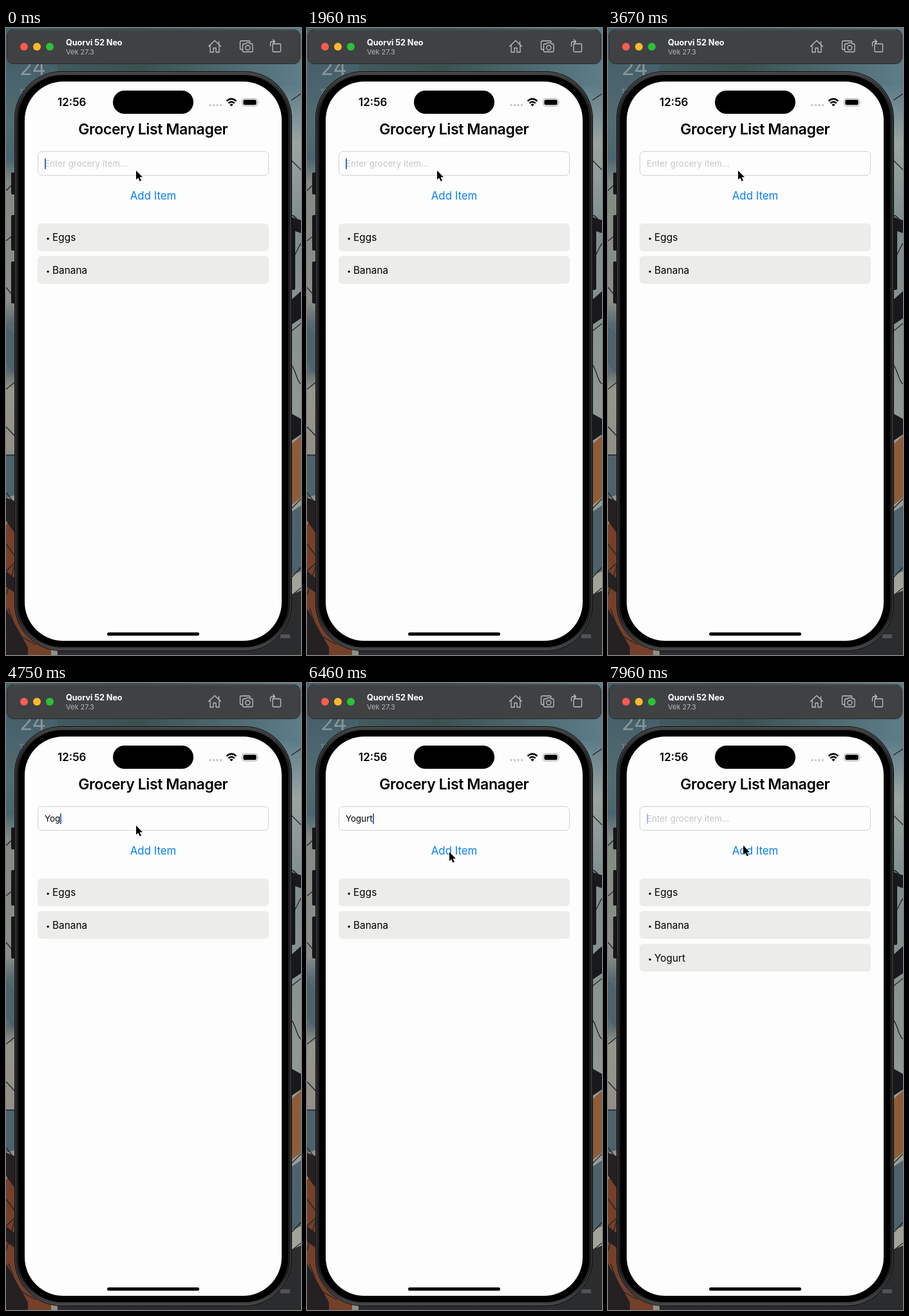
An HTML page for the animation above (8 s loop, 458x972 px).

```html
<!DOCTYPE html>
<html lang="en">
<head>
<meta charset="utf-8">
<title>Grocery List Manager</title>
<style>
  :root { --loop: 8s; }
  html, body { margin: 0; width: 100%; height: 100%; overflow: hidden; background: #2b2c2e; }
  body { position: relative; font-family: Inter, "Open Sans", sans-serif; }
  svg { position: absolute; left: 0; top: 0; width: 458px; height: 972px; }
  .item { font-size: 15.4px; }
  .item rect { fill: #ececea; }
  .bullet { font-size: 11px; }

  .field {
    position: absolute; left: 49px; top: 191px; width: 359px; height: 38px;
    box-sizing: border-box; padding-left: 10px;
    border: 1px solid #cfcfd9; border-radius: 7px;
    display: flex; align-items: center;
    font-size: 13.4px; line-height: 1.35; white-space: pre;
  }
  .placeholder { position: absolute; left: 10px; color: #c6c6ca; animation: placeholder var(--loop) step-end infinite; }
  .word { font-size: 0; animation: word var(--loop) step-end infinite; }
  .word i { font-style: normal; font-size: 0; animation: letter var(--loop) var(--at) step-end infinite; }
  .caret { width: 2px; height: 17px; border-radius: 1px; background: #4468c8; animation: caret var(--loop) linear infinite; }
  .added { animation: added var(--loop) step-end infinite; }
  .pointer { animation: pointer var(--loop) ease-in-out infinite; }

  @keyframes placeholder { 0%, 87% { visibility: visible } 53% { visibility: hidden } }
  @keyframes word { 0%, 87% { font-size: 0 } 50% { font-size: 13.4px } }
  /* Each letter stays until the whole word has been cleared. */
  @keyframes letter { 0% { font-size: 1em } 40%, 100% { font-size: 0 } }
  @keyframes added { 0% { visibility: hidden } 87%, 100% { visibility: visible } }
  @keyframes caret {
    0%, 6%, 12%, 18%, 24.4%, 30.5%, 37%, 43%, 49%, 93% { opacity: 1 }
    8%, 11%, 20%, 23%, 32.5%, 36%, 45%, 48%, 95%, 98.8% { opacity: 0 }
    99.5%, 100% { opacity: .35 }
  }
  @keyframes pointer {
    0%, 71% { transform: translate(202px, 221px) }
    79%, 88% { transform: translate(221px, 262px) }
    94%, 100% { transform: translate(210px, 252px) }
  }
</style>
</head>
<body>
<svg viewBox="0 0 458 972">
  <defs>
    <linearGradient id="sky">
      <stop stop-color="#46606a"/><stop offset=".45" stop-color="#3a5150"/><stop offset="1" stop-color="#5d7d88"/>
    </linearGradient>
    <linearGradient id="leftWall" x2="0" y2="1">
      <stop stop-color="#46606a"/><stop offset=".1" stop-color="#526b72"/>
      <stop offset=".16" stop-color="#48656f"/><stop offset=".2" stop-color="#838983"/>
      <stop offset=".4" stop-color="#8b8e88"/><stop offset=".44" stop-color="#566970"/>
      <stop offset=".52" stop-color="#5b6a6c"/><stop offset=".55" stop-color="#97968c"/>
      <stop offset=".67" stop-color="#908e86"/>
    </linearGradient>
    <linearGradient id="rightWall" x2="0" y2="1">
      <stop stop-color="#5d7d88"/><stop offset=".1" stop-color="#9aa5a2"/>
      <stop offset=".25" stop-color="#7e8c8d"/><stop offset="1" stop-color="#a9a79b"/>
    </linearGradient>
    <linearGradient id="rim" x2="0" y2="1">
      <stop stop-color="#434345"/><stop offset=".06" stop-color="#1f1f21"/>
      <stop offset=".94" stop-color="#1c1c1e"/><stop offset="1" stop-color="#434345"/>
    </linearGradient>
  </defs>

  <!-- wallpaper -->
  <rect width="458" height="972" fill="#2b2c2e"/>
  <rect width="458" height="130" fill="url(#sky)"/>
  <rect y="56" width="80" height="916" fill="url(#leftWall)"/>
  <rect x="380" y="90" width="78" height="882" fill="url(#rightWall)"/>
  <g fill="#4c626c">
    <path d="M0 662H20V722L0 728ZM0 462L20 480V545L0 520Z"/>
    <path d="M440 752L458 740V842L440 850Z"/>
  </g>
  <g fill="#744029">
    <path d="M0 770L20 745V972H0ZM0 890L70 940V972H0Z"/>
    <path d="M440 648L458 632V728L440 742Z" fill="#8e5c38"/>
  </g>
  <path d="M0 728L20 736V792L0 764ZM0 842L20 858V880L0 866ZM0 900L34 960V972H0Z" fill="#252022"/>
  <path d="M440 292L458 298V318L440 312ZM440 424L458 408V450L440 462ZM440 596L458 606V630L440 642Z" fill="#18191d"/>
  <path d="M370 972L440 880L458 872V972Z" fill="#2b2c2e"/>
  <path d="M426 940H441V946H426Z" fill="#525355"/>
  <g fill="none" stroke="#202125" stroke-width="1.3">
    <path d="M0 252L15 238M0 330L15 318M0 402L15 420M0 560L15 548M0 618L15 634M0 662H15M0 720L15 740L2 752M0 800L15 820M0 842L15 828L0 880M4 900L30 972M0 930L46 956"/>
    <path d="M443 112L458 102M443 205L458 220M443 290C452 292 454 302 458 306M443 360C450 352 454 338 458 334M443 470L458 458M443 522C450 530 451 548 458 552M443 745L458 730M443 852L458 836M443 880L458 868"/>
  </g>
  <g fill="#87969a">
    <text x="21" y="73" font-size="33">24</text>
    <text x="21" y="102" font-size="11">12</text>
  </g>

  <!-- phone body -->
  <g fill="#161618">
    <rect x="8" y="224" width="8" height="34" rx="2"/>
    <rect x="8" y="290" width="8" height="55" rx="2"/>
    <rect x="8" y="362" width="8" height="65" rx="2"/>
    <rect x="441" y="306" width="8" height="100" rx="2"/>
  </g>
  <rect x="13.5" y="67.5" width="430" height="898" rx="73" fill="url(#rim)" stroke="#111113"/>
  <rect x="15" y="69" width="427" height="895" rx="71" fill="none" stroke="#525254" stroke-width=".8"/>
  <rect x="19" y="73" width="419" height="887" rx="68"/>
  <rect x="29" y="83" width="399" height="867" rx="60" fill="#fdfdfe"/>
  <rect x="166" y="97" width="125" height="36" rx="18"/>
  <rect x="157" y="937" width="143" height="5" rx="2.5"/>

  <!-- status bar -->
  <text x="80" y="121.3" font-size="17" font-weight="600">12:56</text>
  <path d="M317 119.6H334" stroke="#c8c8ca" stroke-width="3.6" stroke-linecap="round" stroke-dasharray="0 5.5"/>
  <path d="M342.5 113.3Q350 106.5 357.5 113.3M345.3 116.5Q350 112.5 354.7 116.5" fill="none" stroke="#000" stroke-width="2.5"/>
  <path d="M347.4 118.7Q350 116.5 352.6 118.7L350 121.5Z"/>
  <rect x="366.5" y="109.5" width="24" height="11.5" rx="3.7" fill="none" stroke="#a4a4a6"/>
  <rect x="368.3" y="111.2" width="20.4" height="8" rx="2.3"/>
  <path d="M392 113.5Q393.8 115.2 392 117Z" fill="#a4a4a6"/>

  <!-- app -->
  <text x="228.3" y="165.3" font-size="23" font-weight="600" letter-spacing="-.4" text-anchor="middle">Grocery List Manager</text>
  <text x="228.5" y="266.3" font-size="16.8" fill="#087df5" text-anchor="middle">Add Item</text>
  <g class="item">
    <rect x="49" y="303" width="359" height="43" rx="6"/>
    <text y="330"><tspan class="bullet" x="62">•</tspan><tspan x="72">Eggs</tspan></text>
  </g>
  <g class="item">
    <rect x="49" y="353.5" width="359" height="43" rx="6"/>
    <text y="381"><tspan class="bullet" x="62">•</tspan><tspan x="72">Banana</tspan></text>
  </g>
  <g class="item added">
    <rect x="49" y="404.5" width="359" height="43" rx="6"/>
    <text y="432"><tspan class="bullet" x="62">•</tspan><tspan x="72">Yogurt</tspan></text>
  </g>

  <!-- window bar -->
  <rect x="1.5" y="2.5" width="455" height="53" rx="10" fill="#3f4143" stroke="#292b2d"/>
  <path d="M11 3H447" stroke="#646668" stroke-width=".8"/>
  <circle cx="28" cy="29" r="6" fill="#ff5b50"/>
  <circle cx="48" cy="29" r="6" fill="#fdb92c"/>
  <circle cx="68" cy="29" r="6" fill="#2bc238"/>
  <text x="93" y="27" font-size="12.7" font-weight="700" letter-spacing="-.1" fill="#fff">Quorvi 52 Neo</text>
  <text x="93" y="41" font-size="11" fill="#b5b6b7">Vek 27.3</text>
  <g fill="none" stroke="#bfc0c1" stroke-width="1.3" stroke-linejoin="round" stroke-linecap="round">
    <path d="M314.5 28.5L324 19.5L333.5 28.5M317 26.5V37.5H322V31H326V37.5H331V26.5M330.5 25V21"/>
    <path d="M367 33.5H365.5Q363.5 33.5 363.5 31.5V22Q363.5 20 365.5 20H377Q379 20 379 22M369.5 24.5H372L373.2 22.8H378L379.2 24.5H381.5Q383 24.5 383 26V35.5Q383 37 381.5 37H369Q367.5 37 367.5 35.5V26Q367.5 24.5 369.5 24.5Z"/>
    <circle cx="375.3" cy="30.5" r="3.5"/>
    <path d="M416 24.5H425Q426.5 24.5 426.5 26V35.5Q426.5 37 425 37H415.5Q414 37 414 35.5V26Q414 24.5 416 24.5M410.5 28V24Q410.5 21 413.5 21H417M414.5 18L417.5 21L414.5 24"/>
  </g>
</svg>

<div class="field">
  <span class="placeholder">Enter grocery item...</span>
  <span class="word"><i style="--at:4.24s">Y</i><i style="--at:4.44s">o</i><i style="--at:4.64s">g</i><i style="--at:4.86s">u</i><i style="--at:5.04s">r</i><i style="--at:5.24s">t</i></span>
  <span class="caret"></span>
</div>

<svg viewBox="0 0 458 972">
  <path class="pointer" d="M0 0V14L3.2 11.2L5.6 16.5L8 15.4L5.6 10.3H10Z" stroke="#fff" paint-order="stroke"/>
</svg>
</body>
</html>
```
